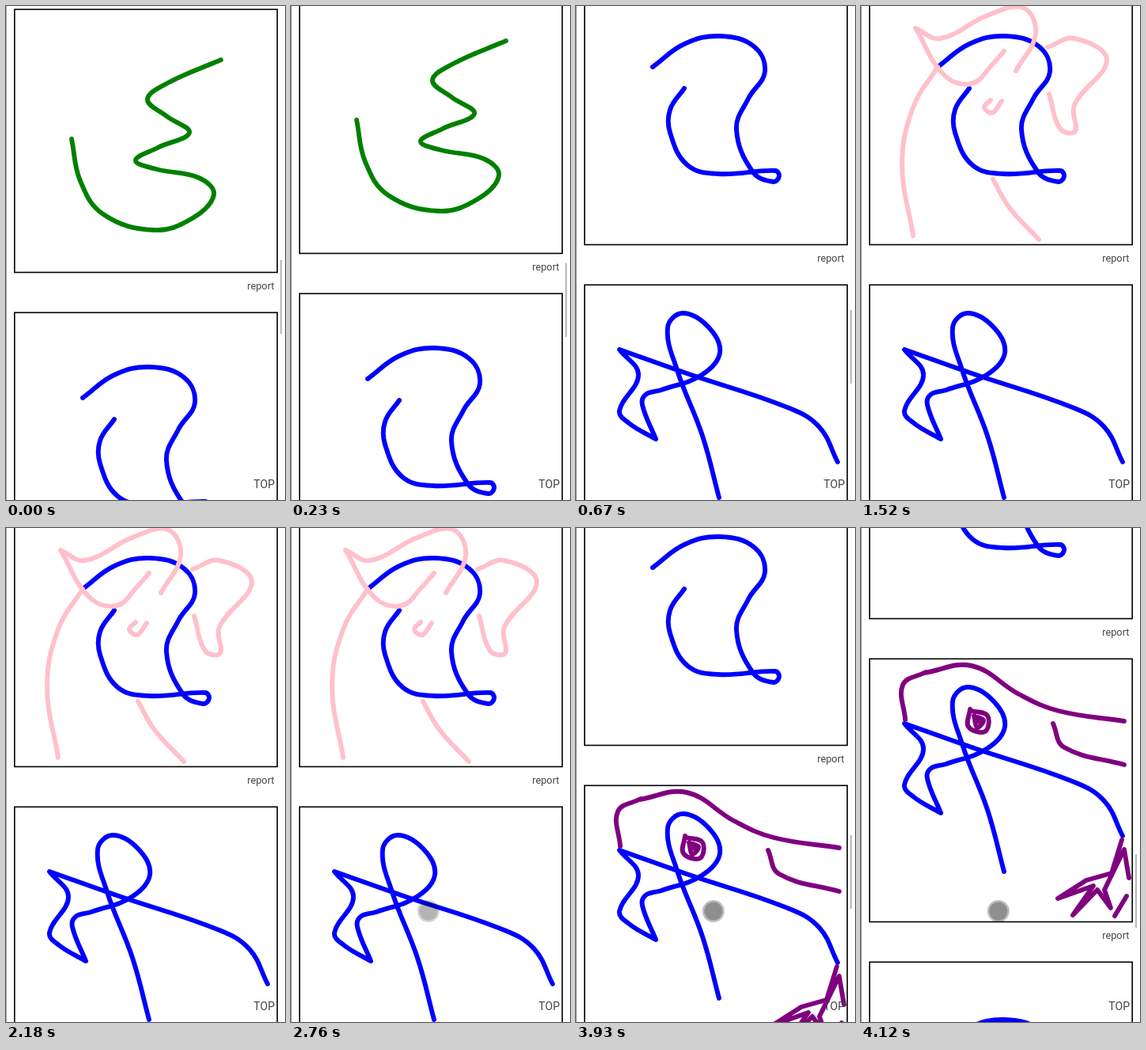
Recreate the animation shown at these times as an HTML page. Size 353 by 624 pixels, loop 4450 ms.

```html
<!DOCTYPE html>
<html lang="en">
<head>
<meta charset="utf-8">
<title>Doodle feed</title>
<style>
  html, body { margin: 0; width: 100%; height: 100%; overflow: hidden; background: #fff; }
  svg { display: block; width: 353px; height: 624px; }
  text { font-family: Roboto, Arial, sans-serif; text-anchor: end; fill: #444; }
  .frame { fill: #fff; stroke: #000; stroke-width: 1.6; }
  .label { font-size: 12.8px; }
  .ink { fill: none; stroke-width: 5.9; stroke-linecap: round; stroke-linejoin: round; }
</style>
</head>
<body>
<svg viewBox="0 0 353 624">
  <g id="feed"></g>
  <rect width="1" height="624" fill="#a6a6a6"/>
  <rect id="bar" x="347" y="321" width="2" height="93" fill="#b8b8b8"/>
  <text x="340" y="608.5" font-size="14">TOP</text>
  <g id="touch" fill-opacity=".25">
    <circle cx="173.8" cy="484" r="14"/>
    <circle cx="173.8" cy="484" r="11.5"/>
  </g>
</svg>
<script>
const LOOP = 4450, PITCH = 383, BAR_RATIO = 0.151, TENSION = 0.4;
const $ = id => document.getElementById(id);

// Key points of each doodle; strokes are separated by ";".
const smile = `83,168 94,221 123,263 187,283 236,268 263,238 244,217 190,206 164,195
  192,179 232,160 203,139 179,118 205,97 272,68`;
const swirl = `97,112 137,83 182,73 225,86 239,118 218,152 203,191 224,245 250,257 257,250
  252,243 180,247 141,236 119,195 119,166 137,139`;
const dog = `97,112 66,163 52,235 66,325;
  69,63 100,76 160,47 205,37 221,70 196,117; 69,63 105,122 140,133 167,108 181,92;
  236,87 270,76 311,103 270,160 271,193 252,190 238,146;
  164,154 156,163 166,170 178,155; 167,254 188,290 225,330`;
const beak = `181,273 160,195 128,112 116,58 135,40 168,58 182,90 159,118 108,137 88,143
  84,156 101,199; 101,199 67,179 55,163 79,118 55,86; 55,86 140,116 270,160 308,184 331,228`;
const bird = `56,81 53,37 82,21; 80,22 140,13 200,49 250,70 333,83; 243,86 257,116 333,138;
  138,68 136,90 157,96 160,76 140,70; 143,76 147,91 155,82 145,78 152,86`;
const claw = 'M330,233 317,275 285,284 249,307 294,291 268,328 299,296 316,319 308,296 ' +
  '333,245 339,281M321,329 336,304';

// Smooth curve through the points, with handles scaled to each chord
function spline(stroke) {
  const p = stroke.trim().split(/\s+/).map(s => s.split(',').map(Number));
  const at = i => p[Math.max(0, Math.min(p.length - 1, i))];
  const gap = (a, b) => Math.hypot(a[0] - b[0], a[1] - b[1]);
  const handle = (i, side) => {
    const a = at(i - 1), b = at(i), c = at(i + 1);
    const k = side * TENSION * gap(b, at(i + side)) / (gap(a, b) + gap(b, c));
    return b.map((v, n) => v + k * (c[n] - a[n]));
  };
  let d = 'M' + p[0];
  for (let i = 1; i < p.length; i++) d += `C${handle(i - 1, 1)} ${handle(i, -1)} ${p[i]}`;
  return d;
}

const path = (d, color) => `<path class="ink" stroke="${color}" d="${d}"/>`;
const ink = (strokes, color) => path(strokes.split(';').map(spline).join(''), color);

const panels = [
  ink(smile, 'green'),
  ink(swirl, 'blue') + `<g id="dog">${ink(dog, 'pink')}</g>`,
  ink(beak, 'blue') + `<g id="bird">${ink(bird, 'purple')}${path(claw, 'purple')}</g>`,
  `<g transform="translate(0 4)">${ink(swirl, 'blue')}</g>`
];

$('feed').innerHTML = panels.map((art, i) => `<g transform="translate(0 ${i * PITCH})">
  <rect class="frame" x="10.8" y="4.3" width="332.4" height="332.2"/>
  <text class="label" x="339.5" y="358">report</text>${art}</g>`).join('');

// Steps are [time, value]; a value holds until the next step.
function glide(start, end, from, to, power = 1, n = 7) {
  return Array.from({ length: n }, (_, i) => [
    start + (end - start) * i / (n - 1),
    to - (to - from) * (1 - (i + 1) / n) ** power
  ]);
}
const scroll = [
  [0, 0],
  ...glide(30, 230, 0, 24),
  ...glide(360, 540, 24, 418, 1.5),
  ...glide(3930, 4120, 418, 605)
];

function play(id, steps, style) {
  const frames = steps.map(([t, v]) => ({ offset: t / LOOP, easing: 'steps(1, end)', ...style(v) }));
  frames.push({ ...frames[frames.length - 1], offset: 1 });
  $(id).animate(frames, { duration: LOOP, iterations: Infinity });
}
const shift = k => v => ({ transform: `translate(0px, ${Math.round(Math.round(v) * k)}px)` });
const fade = v => ({ opacity: v });

play('feed', scroll, shift(-1));
play('bar', scroll, shift(BAR_RATIO));
play('bar', [[0, 1], ...glide(1020, 1200, 1, 0, 1, 3), [3930, 1]], fade);
play('dog', [[0, 0], [1520, 1], [3250, 0]], fade);
play('bird', [[0, 0], [3250, 1]], fade);
play('touch', [[0, 0], ...glide(2730, 2790, 0, 1, 1, 3)], fade);
</script>
</body>
</html>
```
